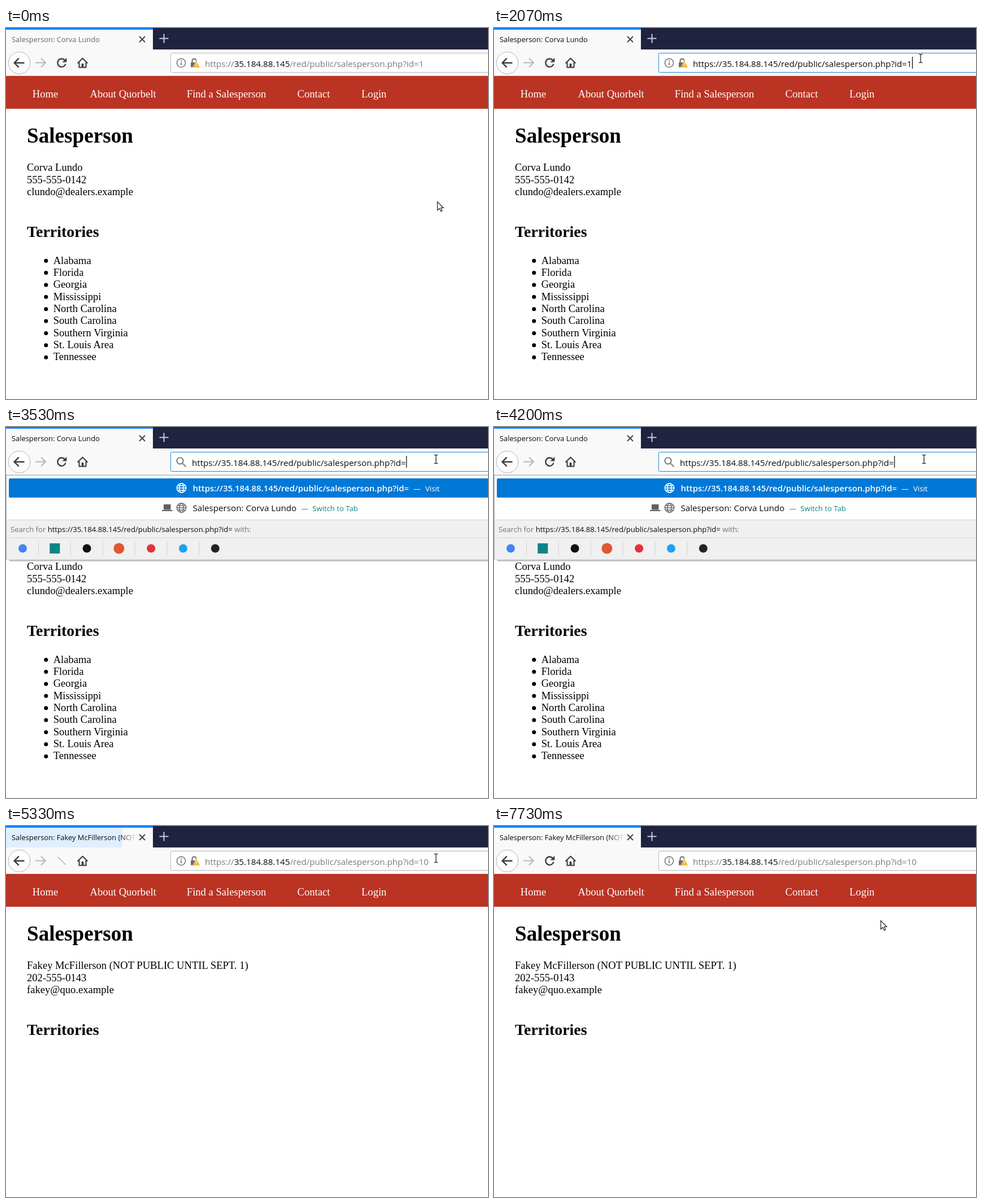
An HTML page for the animation above (8 s loop, 853 by 657 pixels).

```html
<!DOCTYPE html>
<html lang="en">
<head>
<meta charset="utf-8">
<title>Salesperson</title>
<style>
  html, body { margin: 0; width: 100%; height: 100%; overflow: hidden; background: #fff; }
  svg { display: block; }
  .ui { font-family: "Open Sans", "Noto Sans", sans-serif; font-size: 15.17px; fill: #0c0c0d; }
  .page { font-family: "Liberation Serif", "Times New Roman", serif; font-size: 18.6px; fill: #000; }
  .page h1, .h1 { font-size: 37.2px; font-weight: bold; }
  .h2 { font-size: 27.9px; font-weight: bold; }
  .nav { fill: #fff; }
  .small { font-size: 13.1px; }
  .grey { fill: #737373; }
  .teal { fill: #0c8383; }
  .bold { font-weight: 600; font-size: 14.9px; fill: #fff; }
  .icon { fill: none; stroke: #3d3d40; stroke-width: 2.4; }
  .thin { fill: none; stroke-width: 1.5; }
</style>
</head>
<body>
<svg width="853" height="657" viewBox="0 0 853 657">
  <defs>
    <linearGradient id="fade" gradientUnits="userSpaceOnUse" x1="203" x2="231" y1="0" y2="0">
      <stop offset="0" stop-color="#fff"/><stop offset="1" stop-color="#000"/>
    </linearGradient>
    <mask id="tabMask" maskUnits="userSpaceOnUse" x="0" y="0" width="260" height="38">
      <rect width="260" height="38" fill="url(#fade)"/>
    </mask>
    <g id="globe" class="thin">
      <circle r="8.2"/><ellipse rx="3.7" ry="8.2"/>
      <path d="M-8 0H8M-7-4H7M-7 4H7"/>
    </g>
  </defs>

  <g class="page">
    <rect y="85" width="853" height="58" fill="#bb3322"/>
    <g class="nav">
      <text x="46.8" y="123">Home</text>
      <text x="148.5" y="123">About Quorbelt</text>
      <text x="319.8" y="123">Find a Salesperson</text>
      <text x="515.5" y="123">Contact</text>
      <text x="629" y="123">Login</text>
    </g>
    <text class="h1" x="37" y="202.5">Salesperson</text>
    <text id="name" x="37" y="253"></text>
    <text id="phone" x="37" y="274.5"></text>
    <text id="mail" x="37" y="296"></text>
    <text class="h2" x="37" y="370">Territories</text>
    <g id="list"></g>
  </g>

  <g class="ui">
    <rect width="853" height="38" fill="#202340"/>
    <rect width="260" height="38" fill="#f9f9fa"/>
    <rect id="flash" y="3" height="35" fill="#dfefff"/>
    <rect width="260" height="3" fill="#0a84ff"/>
    <g mask="url(#tabMask)"><text id="tab" x="10" y="24.7" font-size="12.87"></text></g>
    <path class="icon" stroke-width="2" style="stroke-width:1.8" d="M236 15l10 10M246 15l-10 10"/>
    <path class="icon" style="stroke:#c9c9d2;stroke-width:2" d="M271.500 18.500h16M279.500 10.500v16"/>

    <rect y="38" width="853" height="47" fill="#f9f9fa"/>
    <path d="M0 84.500H853" stroke="#dcdcde"/>
    <circle cx="23.500" cy="61.800" r="19.300" fill="#fdfdfd" stroke="#b4b4b6"/>
    <path class="icon" d="M32.500 61.700H15M22.700 53.700l-8 8 8 8"/>
    <path class="icon" style="stroke:#b7b7b9;stroke-width:2.1" d="M52 61.500H69M62 53.700l8 7.800-8 7.800"/>
    <g id="reload">
      <path class="icon" d="M104 57A7.200 7.200 0 1 0 105.500 63.500"/>
      <path d="M107.300 52.800v7.700h-7.700z" fill="#3d3d40"/>
    </g>
    <path id="stop" class="icon" d="M91.500 54.500l14 14M105.500 54.500l-14 14"/>
    <path id="slash" class="icon" style="stroke:#b5b5b7;stroke-width:1.6" d="M91.500 54.500l14 14"/>
    <path class="icon" style="stroke-width:2.1" d="M126.500 62.500l9-8.800 9 8.800M129.500 61v8.800h12V61"/>
    <path d="M133.700 63h3.700v7h-3.700z" fill="#3d3d40"/>

    <rect id="bar" x="291.500" y="44.500" width="600" height="34" rx="2" fill="#fff"/>
    <g id="site">
      <circle class="thin" cx="310" cy="61.800" r="7.600" stroke="#737373"/>
      <path d="M309.200 60.500h1.700v5.500h-1.700zM309.200 57h1.700v1.900h-1.700z" fill="#737373"/>
      <path class="thin" style="stroke-width:2" d="M329.500 62V58a3.600 3.600 0 0 1 7.200 0v3" stroke="#6b6b6e"/>
      <rect x="327" y="61" width="11" height="8.500" rx="1" fill="#6b6b6e"/>
      <path d="M337 57.300l6.300 12.900h-12.600z" fill="#fdb515" stroke="#f9f9fa" stroke-width=".6"/>
      <path d="M336.400 61.500h1.300v4h-1.300zM336.400 66.700h1.300v1.400h-1.300z" fill="#fff"/>
    </g>
    <g id="lens" class="icon" style="stroke:#8c8c8e">
      <circle cx="308" cy="59.800" r="5.700"/><path d="M312 64l6.500 6.300"/>
    </g>
    <text id="url" y="68.700"><tspan class="dim">https://</tspan><tspan>35.184.88.145</tspan><tspan class="dim">/red/public/salesperson.php?id=</tspan><tspan class="dim" id="typed"></tspan></text>
    <rect id="caret" y="51" width="1.200" height="21" fill="#000"/>

    <g id="drop">
      <rect x="6" y="230" width="860" height="8" fill="#000" opacity=".22"/>
      <rect x=".5" y="85.500" width="870" height="149.500" fill="#fff" stroke="#b0b0b2"/>
      <rect x="5" y="91" width="870" height="34" rx="2" fill="#0078d7"/>
      <use href="#globe" x="310.500" y="108" stroke="#fff"/>
      <text class="bold" x="330.500" y="114"><tspan class="full"></tspan><tspan class="small" font-weight="400" dx="8">—</tspan><tspan class="small" font-weight="400" dx="8">Visit</tspan></text>
      <path d="M279 137h12.500v9.500H279zM276 147h18.500v2H276z" fill="#606063"/>
      <use href="#globe" x="310.500" y="143" stroke="#69696c"/>
      <text x="330.500" y="149.300"><tspan id="match"></tspan><tspan class="small grey" dx="8">—</tspan><tspan class="small teal" dx="7">Switch to Tab</tspan></text>
      <path d="M1 164.500H853V234.500H1z" fill="#f0f0f0"/>
      <path d="M1 164.500H853M1 196.500H853" stroke="#d6d6d8"/>
      <text class="small grey" x="8" y="185.500">Search for <tspan class="full" fill="#0c0c0d"></tspan> with:</text>
      <g id="engines"></g>
    </g>
  </g>

  <path id="arrow" d="M.500.500v15.200l3.600-3.300 2.500 5.300 2.300-1-2.400-5.200h4.600z" fill="#fff" stroke="#111" stroke-width="1.100"/>
  <path id="beam" d="M-3.500-7.500h2.500l1 1 1-1h2.500M0-6.500v13M-3.500 7.500h2.500l1-1 1 1h2.500" fill="none" stroke="#111" stroke-width="1.200"/>
</svg>

<script>
const LOOP = 8000, TICK = 1000 / 15;
const BASE = 'https://35.184.88.145/red/public/salesperson.php?id=';
const $ = id => document.getElementById(id);
const show = (id, on) => $(id).setAttribute('visibility', on ? 'visible' : 'hidden');
const set = (id, attrs) => { for (const k in attrs) $(id).setAttribute(k, attrs[k]); };

const people = [
  { name: 'Corva Lundo', phone: '555-555-0142', mail: 'clundo@dealers.example' },
  { name: 'Fakey McFillerson (NOT PUBLIC UNTIL SEPT. 1)', phone: '202-555-0143', mail: 'fakey@quo.example' }
];
const states = ['Alabama', 'Florida', 'Georgia', 'Mississippi', 'North Carolina',
  'South Carolina', 'Southern Virginia', 'St. Louis Area', 'Tennessee'];
$('list').innerHTML = states.map((s, i) => {
  const y = 417.5 + i * 21.37;
  return `<circle cx="70.8" cy="${y - 5.3}" r="3.5"/><text x="83.7" y="${y}">${s}</text>`;
}).join('');

// search engine marks, as plain dots and squares
const marks = ['#4285f4', '#0c8484', '#111', '#de5833', '#e53238', '#1da1f2', '#222'];
$('engines').innerHTML = marks.map((c, i) => {
  const x = 29.5 + i * 56.8;
  const mark = i === 1
    ? `<rect x="${x - 9}" y="206" width="18" height="18" fill="${c}"/>`
    : `<circle cx="${x}" cy="215" r="${i === 3 ? 9.5 : 7.5}" fill="${c}"/>`;
  return mark + (i < 6 ? `<path d="M${x + 28} 203v24" stroke="#cfcfd1"/>` : '');
}).join('');

// each entry changes part of the browser's state
const steps = [
  [0, { active: false, person: 0, mode: 'idle', id: '1', caret: false, button: 'reload' }],
  [1870, { active: true, mode: 'focus', caret: true }],
  [2200, { caret: false }],
  [2600, { caret: true }],
  [3130, { caret: false }],
  [3470, { mode: 'type', id: '', caret: true }],
  [3670, { caret: false }],
  [4200, { caret: true }],
  [4330, { id: '1' }],
  [4530, { id: '10' }],
  [4870, { mode: 'idle', caret: false, button: 'stop' }],
  [5200, { person: 1 }],
  [5330, { button: 'slash' }],
  [5730, { button: 'reload' }]
];

// mouse strokes: start, end, then four Bezier points
const strokes = [
  [70, 870, 763, 307, 600, 450, 350, 420, 120, 330],
  [930, 1730, 120, 330, -220, 250, 450, 180, 755, 54],
  [2470, 2730, 755, 54, 757, 55, 759, 56, 761, 57],
  [5390, 5800, 761, 57, 600, 150, 250, 290, 15, 285],
  [6070, 6400, 15, 285, 200, 180, 480, 190, 525, 250],
  [6400, 6730, 525, 250, 560, 420, 120, 420, 90, 275],
  [6800, 6870, 90, 275, 105, 285, 125, 295, 141, 300],
  [6930, 7730, 141, 300, 300, 540, 700, 460, 684, 167]
];

function mouseAt(t) {
  const [t0, t1, ...p] = strokes.filter(s => s[0] <= t).pop() || strokes[0];
  const k = Math.min(1, Math.max(0, (t - t0) / (t1 - t0)));
  const u = k * k * (3 - 2 * k), v = 1 - u;
  return [0, 1].map(i =>
    v * v * v * p[i] + 3 * v * v * u * p[i + 2] + 3 * v * u * u * p[i + 4] + u * u * u * p[i + 6]);
}

function render(time) {
  const t = Math.floor((time + 5) / TICK) * TICK + 5;
  const s = Object.assign({}, ...steps.filter(e => e[0] <= t).map(e => e[1]));
  const who = people[s.person], idle = s.mode === 'idle', typing = s.mode === 'type';

  for (const k in who) $(k).textContent = who[k];
  $('tab').textContent = $('match').textContent = 'Salesperson: ' + who.name;
  set('tab', { fill: s.active ? '#0c0c0d' : '#66666a' });
  show('list', s.person === 0);

  $('typed').textContent = s.id;
  document.querySelectorAll('.dim').forEach(e => e.setAttribute('fill', idle ? '#7b7b7d' : '#0c0c0d'));
  document.querySelectorAll('.full').forEach(e => { e.textContent = BASE + s.id; });
  const left = typing ? 329 : 352;
  set('url', { x: left });
  set('caret', { x: left + $('url').getComputedTextLength() + .5 });
  show('caret', s.caret);
  set('bar', { stroke: idle ? '#b8b8ba' : '#1a86d9' });
  show('site', !typing);
  show('lens', typing);
  show('drop', typing);
  for (const b of ['reload', 'stop', 'slash']) show(b, s.button === b);

  // pale sweep across the tab when the page is ready
  const dt = t - 5335;
  const lit = dt > -100 && dt < 340;
  set('flash', {
    width: lit ? Math.min(260, 202 + dt * 1.1) : 0,
    opacity: Math.min(1, Math.max(0, 1 - dt / 340))
  });

  const [x, y] = mouseAt(t);
  const beam = y < 80 || (t > 5600 && t < 6925);
  const at = { transform: `translate(${Math.round(x)} ${Math.round(y)})` };
  set('arrow', at);
  set('beam', at);
  show('beam', beam);
  show('arrow', !beam);
}

const start = performance.now();
function loop() {
  render((performance.now() - start) % LOOP);
  requestAnimationFrame(loop);
}
loop();
</script>
</body>
</html>
```
